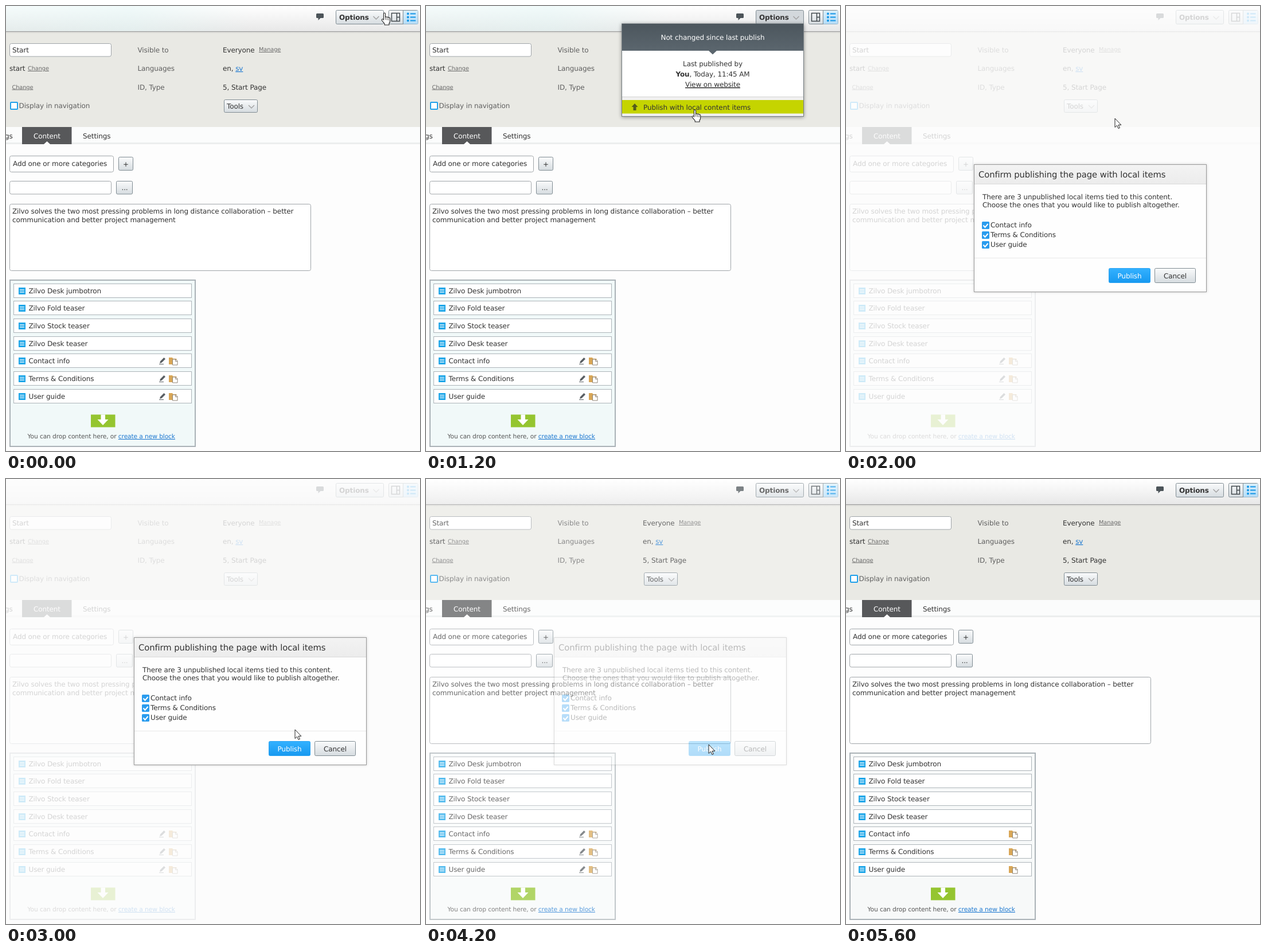
An HTML page for the animation above (5700 ms loop, 722 px wide and 776 px high).

```html
<!DOCTYPE html>
<html lang="en">
<head>
<meta charset="utf-8">
<title>Publish with local content</title>
<style>
  html, body { margin: 0; width: 100%; height: 100%; overflow: hidden; background: #fdfdfd; }
  svg { display: block; width: 100%; height: 100%; }
  text { font: 12px "DejaVu Sans", Verdana, sans-serif; letter-spacing: -.11px; fill: #333; text-rendering: geometricPrecision; white-space: pre; }
  .label { fill: #606060; }
  .small { font-size: 9.8px; fill: #6a6a6a; text-decoration: underline; }
  .hint { font-size: 10.7px; fill: #555; }
  .link { fill: #1c78d0; text-decoration: underline; }
  .bold { font-weight: bold; }
  .title { font-size: 14.8px; }
  .white { fill: #fff; }
  .mid { text-anchor: middle; }
  .field { fill: #fff; stroke: #a0a5a9; }
  .button { fill: url(#grey); stroke: #7f8b92; }
  .shadow { filter: drop-shadow(0 1px 3px rgba(0, 0, 0, .4)); }
  .soft { filter: drop-shadow(0 0 2px rgba(0, 0, 0, .2)); }
  .line { fill: none; stroke-width: 1.5; }
</style>
</head>
<body>
<svg id="stage" viewBox="0 0 722 776" preserveAspectRatio="none"></svg>
<script>
const LOOP = 5700, STEP = 100;

const text = (x, y, content, cls = '') => `<text x="${x}" y="${y}" class="${cls}">${content}</text>`;
const rect = (x, y, w, h, attrs) => `<rect x="${x}" y="${y}" width="${w}" height="${h}" ${attrs}/>`;
const path = (d, attrs) => `<path d="${d}" ${attrs}/>`;
const field = (x, y, w, h, attrs = '') => rect(x, y, w, h, `rx="3" class="field" ${attrs}`);
const button = (x, y, w, h, attrs = '') => rect(x, y, w, h, `rx="2" class="button" ${attrs}`);
const chevron = (x, y) => path(`M${x - 5} ${y - 2.5}l5 5 5-5`, 'class="line" stroke="#a3a3a3"');
const gradient = (id, from, to) =>
  `<linearGradient id="${id}" x2="0" y2="1"><stop stop-color="${from}"/><stop offset="1" stop-color="${to}"/></linearGradient>`;

const defs = `<defs>
  ${gradient('bar', '#fff', '#e8e8e8')}
  ${gradient('below', '#c9c9c6', '#eaeae5')}
  ${gradient('grey', '#fafbfc', '#d6dce0')}
  ${gradient('pale', '#d9effc', '#b5dcf7')}
  ${gradient('blue', '#33b1ff', '#1799f0')}
  ${gradient('slate', '#4c565d', '#5b666e')}
  ${gradient('caption', '#f3f3f3', '#ececec')}
  <linearGradient id="teal"><stop stop-color="#dff5f4" stop-opacity=".3"/><stop offset=".3" stop-color="#dff5f4" stop-opacity=".45"/>
  <stop offset=".6" stop-color="#dff5f4" stop-opacity="0"/></linearGradient>
</defs>`;

const viewToggle =
  button(667.5, 7.5, 51, 24) + rect(693, 8, 25.5, 23.5, 'fill="url(#pale)"') +
  path('M692.5 8v23.5', 'stroke="#7f8b92"') +
  path('M672.5 12.5h14v14h-14zM681.5 12.5v14M681.5 19.5h5', 'class="line" stroke="#41484d"') +
  [13.5, 19.5, 25.5].map(y => `<circle cx="701" cy="${y}" r="2" fill="#1496e6"/>` +
    rect(705, y - 1, 9.5, 2, 'fill="#1496e6"')).join('');

const header =
  rect(0, 0, 722, 44, 'fill="url(#bar)"') + rect(0, 0, 722, 44, 'id="barTint" fill="url(#teal)"') +
  rect(0, 45, 722, 166, 'fill="#e9e9e4"') + rect(0, 44, 722, 4, 'fill="url(#below)"') +
  rect(0, 44, 722, 1, 'fill="#9b9b9b"') +
  path('M542.5 13h10q1.5 0 1.5 1.5v5q0 1.5-1.5 1.5h-4l-4 4v-4h-2q-1.5 0-1.5-1.5v-5q0-1.5 1.5-1.5z', 'fill="#4c5459"') +
  button(575.5, 7.5, 83, 24, 'id="options"') + text(581, 24, 'Options', 'bold') + chevron(645.5, 20.5) + viewToggle;

const properties =
  field(6.5, 65.5, 177, 22.5) + text(11, 81, 'Start') +
  text(6, 113, 'start') + text(38, 112, 'Change', 'small') + text(10.5, 144.5, 'Change', 'small') +
  rect(8, 168, 12, 12, 'rx="1" fill="#fff" stroke="#1fa0ea" stroke-width="2"') +
  text(22.5, 178, 'Display in navigation', 'label') +
  text(229.5, 80.5, 'Visible to', 'label') + text(229.5, 113, 'Languages', 'label') + text(229.5, 145.5, 'ID, Type', 'label') +
  text(378, 80.5, 'Everyone') + text(441, 79, 'Manage', 'small') +
  text(378, 113, 'en, <tspan class="link">sv</tspan>') + text(378, 145.5, '5, Start Page') +
  button(380.5, 163.5, 58, 22) + text(385, 179, 'Tools') + chevron(428, 175.5);

const tabs =
  rect(0, 211, 722, 27, 'fill="#fbfcfc"') + rect(0, 238, 722, 3, 'fill="#eceeee"') +
  rect(28, 211, 86.5, 30, 'fill="#57585a"') + path('M66 241l5.5-5 5.5 5z', 'fill="#fdfdfd"') +
  text(-2, 231, 'gs') + text(48, 231, 'Content', 'white') + text(134, 231, 'Settings');

const form =
  field(6.5, 261.5, 181, 28) + text(12, 279, 'Add one or more categories') +
  button(196.5, 263.5, 25, 23) + text(209, 279.5, '+', 'mid') +
  field(6.5, 305.5, 177, 22.5) + button(192.5, 305.5, 28, 22.5) + text(207, 321, '...', 'mid') +
  field(6.5, 345.5, 525, 116, 'id="summary"') +
  text(11, 362, 'Zilvo solves the two most pressing problems in long distance collaboration – better') +
  text(11, 376.5, 'communication and better project management');

const pencil = y =>
  path(`M268 ${y + 4.5}l1-3.5 6.5-6.5 2.5 2.5-6.5 6.5zM267 ${y + 5.5}h8v1h-8z`, 'class="pencil" fill="#5a5f63"');
const folder = y =>
  path(`M284 ${y - 6}h6l1.5 2h6v10h-13.5z`, 'fill="#d9a757"') +
  path(`M290.5 ${y - 3}h5.5l3 3v7h-8.5z`, 'fill="#fff" stroke="#85796a" stroke-width=".9"') +
  path(`M295.5 ${y - 3}v3.5h3.5`, 'fill="none" stroke="#85796a" stroke-width=".9"');

const blocks = ['Zilvo Desk jumbotron', 'Zilvo Fold teaser', 'Zilvo Stock teaser', 'Zilvo Desk teaser',
  'Contact info', 'Terms &amp; Conditions', 'User guide'];
const blockRow = (name, i) => {
  const y = Math.floor(484 + i * 30.7);
  return rect(13.5, y + .5, 310, 24, 'fill="#fff" stroke="#adb4b9"') +
    rect(22, y + 7, 12, 12, 'fill="#1ba5e8"') +
    path(`M24 ${y + 10.5}h8m-8 2.5h8m-8 2.5h8`, 'stroke="#fff" stroke-width="1.1"') +
    text(39.5, y + 17, name) + (i > 3 ? pencil(y + 12.5) + folder(y + 13) : '');
};
const contentArea =
  rect(7, 478, 323, 290, 'id="area" stroke="#aab2b7" stroke-width="2"') + blocks.map(blockRow).join('') +
  rect(148, 712.5, 42.5, 22, 'fill="#95c530"') +
  path('M165.5 712.5h7.5v8.5h5.5l-9.5 10-9.5-10h6z', 'fill="#fff"') +
  text(37.5, 754, 'You can drop content here, or <tspan class="link">create a new block</tspan>', 'hint');

const menu = `<g id="menu"><g class="shadow">${rect(341.5, 31, 317, 161.5, 'fill="#f1f1f1" stroke="#777f84"')}</g>` +
  rect(342, 78, 316, 80, 'fill="#fff"') + rect(342, 158, 316, 1, 'fill="#d2d2d2"') +
  rect(342, 31, 316, 47, 'fill="url(#slate)"') + path('M493 78h14l-7 6.5z', 'fill="#5b666e"') +
  text(500, 59, 'Not changed since last publish', 'white mid') +
  text(500, 105, 'Last published by', 'mid') +
  text(500, 123, '<tspan class="bold">You</tspan>, Today, 11:45 AM', 'mid') +
  `<g text-decoration="underline">${text(500, 141, 'View on website', 'mid')}</g>` +
  rect(342, 164, 316, 23.5, 'id="menuRow" fill="#c5d400"') +
  path('M364 170l5.5 6h-3v6h-5v-6h-3z', 'fill="#555c1c"') +
  text(379, 180.5, 'Publish with local content items') + '</g>';

const checkItem = (name, i) => {
  const y = 376 + i * 17;
  return rect(237, y, 13, 13, 'rx="1.5" fill="#2a9cee"') +
    path(`M239.5 ${y + 6.5}l3 3.5 5-6`, 'fill="none" stroke="#fff" stroke-width="2"') + text(252, y + 10, name);
};
const dialog = `<g id="dialog"><g class="soft">${rect(223.5, 276.5, 405, 222, 'fill="#fefefe" stroke="#999"')}</g>` +
  rect(224, 277, 404, 33, 'fill="url(#caption)"') + rect(224, 310, 404, 1, 'fill="#dadada"') +
  text(231, 299, 'Confirm publishing the page with local items', 'title') +
  text(238, 337, 'There are 3 unpublished local items tied to this content.') +
  text(238, 351, 'Choose the ones that you would like to publish altogether.') +
  blocks.slice(4).map(checkItem).join('') + rect(224, 439, 404, 1, 'fill="#e8e8e8"') +
  rect(458.5, 457.5, 72, 25, 'rx="2" fill="url(#blue)" stroke="#2aa3f2"') + text(494.5, 475, 'Publish', 'white mid') +
  button(538.5, 457.5, 71, 25) + text(574, 475, 'Cancel', 'mid') + '</g>';

const cursorShapes = {
  arrow: path('M0 0v15.5l3.6-3.3 2.4 5.4 2.4-1.1-2.4-5.1h4.8z', 'fill="#fff" stroke="#222"'),
  hand: path('M-.5 12V1.5a1.5 1.5 0 0 1 3 0V8a1.4 1.4 0 0 1 2.8.3 1.4 1.4 0 0 1 2.8.6 1.4 1.4 0 0 1 2.6.8V14q0 3-1.7 4.5V21H1.2v-2L-3.6 13a1.5 1.5 0 0 1 2.2-1.9z',
    'fill="#fff" stroke="#222" stroke-width="1.1"') + path('M2.6 8v4M5.4 9v3.5M8.1 9.5V13', 'stroke="#222" stroke-width=".8"'),
  beam: path('M-3-8h2l1 1 1-1h2M-3 8h2l1-1 1 1h2M0-7V7', 'fill="none" stroke="#222"')
};
const cursor = '<g id="cursor">' +
  Object.entries(cursorShapes).map(([name, shape]) => `<g id="${name}">${shape}</g>`).join('') + '</g>';

document.getElementById('stage').innerHTML = defs + rect(0, 0, 722, 776, 'fill="#fdfdfd"') +
  header + properties + tabs + form + contentArea + menu +
  rect(0, 0, 722, 776, 'id="veil" fill="#fdfdfd"') + dialog + cursor;

// Pointer path: time, x, y and the shape used from that time on.
const track = [
  [0, 659, 12, 'hand'], [300, 617, 17, 'hand'], [400, 612, 19, 'hand'], [600, 603, 30, 'arrow'],
  [1000, 480, 168, 'hand'], [1200, 468, 181, 'hand'], [1500, 469, 181, 'arrow'], [1800, 469, 181, 'arrow'],
  [2000, 469, 196, 'arrow'], [2500, 469, 196, 'arrow'], [2600, 469, 239, 'arrow'], [2800, 500, 387, 'arrow'],
  [2900, 504, 428, 'arrow'], [3000, 504, 437, 'arrow'], [3100, 504, 455, 'arrow'], [3200, 501, 459, 'hand'],
  [3500, 493, 463, 'hand'], [4100, 493, 463, 'arrow'], [4300, 493, 463, 'arrow'], [4400, 499, 440, 'beam'],
  [5200, 499, 440, 'beam'], [5300, 593, 363, 'arrow'], [5400, 653, 272, 'arrow'], [5500, 692, 210, 'arrow'],
  [5600, 722, 165, 'none']
];

const ramp = (t, from, to) => Math.min(1, Math.max(0, (t - from) / (to - from)));

function pointerAt(t) {
  const i = track.findLastIndex(key => key[0] <= t);
  const [t0, x0, y0, shape] = track[i];
  const [t1, x1, y1] = track[i + 1] || [LOOP, x0, y0];
  const k = ramp(t, t0, t1);
  return { x: Math.round(x0 + (x1 - x0) * k), y: Math.round(y0 + (y1 - y0) * k), shape };
}

const part = id => document.getElementById(id);
const show = (el, visible) => { el.style.display = visible ? '' : 'none'; };
const pencils = document.querySelectorAll('.pencil');
const start = performance.now();

function draw() {
  const t = Math.floor((performance.now() - start) % LOOP / STEP) * STEP;
  const fadeOut = 1 - ramp(t, 4000, 4300);
  const menuOpen = t >= 400 && t < 1500;
  const tinted = t < 1500;
  const pointer = pointerAt(t);

  show(part('menu'), menuOpen);
  show(part('menuRow'), pointer.y >= 164);
  part('options').style.fill = menuOpen ? '#d3d8dc' : '';
  part('veil').setAttribute('opacity', t < 1500 ? 0 : .8 * fadeOut);
  part('dialog').setAttribute('opacity', Math.min(ramp(t, 1700, 2000), fadeOut));
  show(part('barTint'), tinted);
  part('area').setAttribute('fill', tinted ? '#f1f9f9' : '#f7f9f9');
  part('summary').style.stroke = pointer.shape === 'beam' ? '#7d858a' : '';
  pencils.forEach(el => show(el, t < 4300));

  part('cursor').setAttribute('transform', `translate(${pointer.x} ${pointer.y})`);
  for (const name in cursorShapes) show(part(name), name === pointer.shape);
  requestAnimationFrame(draw);
}
draw();
</script>
</body>
</html>
```
